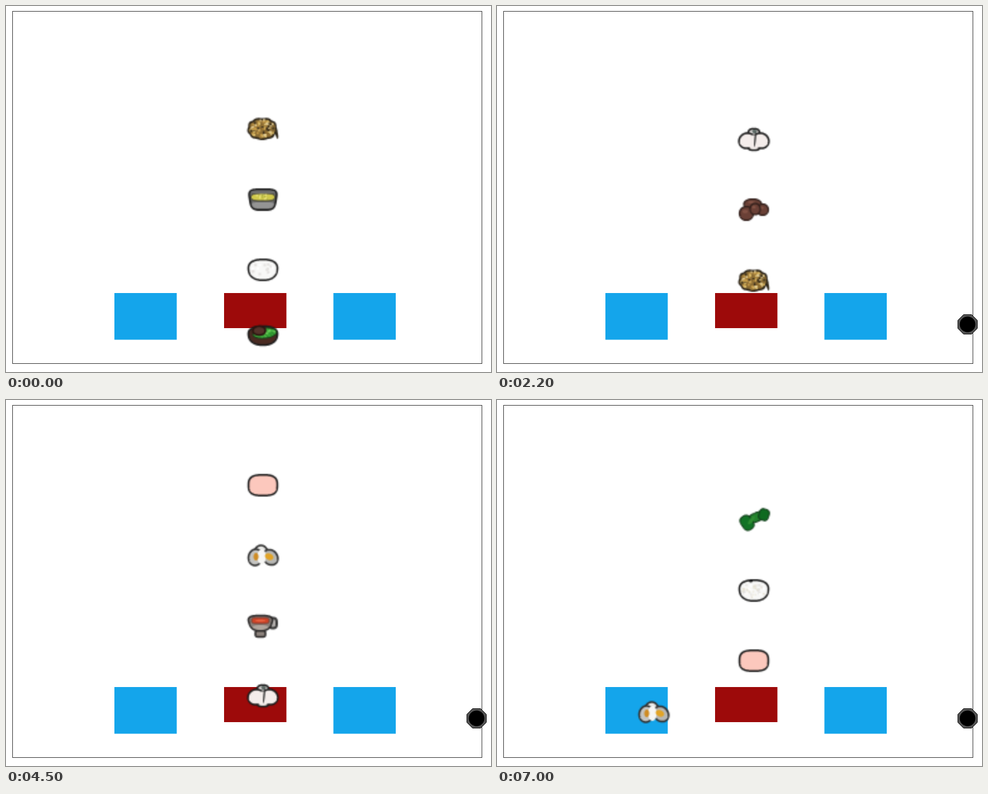
Recreate the animation shown at these times as an HTML page with a canvas. Size 774x584 px, loop 7.1 s.

```html
<!DOCTYPE html>
<html lang="en">
<head>
<meta charset="utf-8">
<title>Falling ingredients</title>
<style>
html, body { margin: 0; width: 100%; height: 100%; overflow: hidden; background: #fff; }
canvas { display: block; }
</style>
</head>
<body>
<canvas id="stage" width="774" height="584"></canvas>
<script>
const W = 774, H = 584, LOOP = 7100, STEP = 100;
const LANE_X = 410, GAP = 112.4, SPAWN_Y = 122, SIDE_SPEED = 0.56, SIDE_REACH = 172;
const ZONE_Y = 463, ZONE_DRAG = 0.1;
const INK = '#1c1c1c';
const ctx = document.getElementById('stage').getContext('2d');

// Distance fallen at given times; linear in between
const FALL = [[0, 0], [1600, 176], [2800, 307], [3800, 423], [5300, 592], [6400, 718], [7100, 793]];

function layer(w, h) {
  const c = document.createElement('canvas');
  c.width = w;
  c.height = h;
  return c.getContext('2d');
}

function paint(g, fill, line, width) {
  if (fill) { g.fillStyle = fill; g.fill(); }
  if (line) { g.strokeStyle = line; g.lineWidth = width; g.stroke(); }
}

// Superellipse: power squares it off, taper narrows the bottom, wave adds bumps
function shape(g, x, y, rx, ry, fill, opt = {}) {
  const { line, width = 3, power = 2, taper = 0, turn = 0, wave = 0, bumps = 9 } = opt;
  const bend = v => Math.sign(v) * Math.abs(v) ** (2 / power);
  g.save();
  g.translate(x, y);
  g.rotate(turn);
  g.beginPath();
  for (let a = 0; a < Math.PI * 2; a += 0.05) {
    const k = 1 + wave * Math.sin(bumps * a);
    const s = bend(Math.sin(a));
    g.lineTo(rx * k * bend(Math.cos(a)) * (1 - taper * s), ry * k * s);
  }
  g.closePath();
  paint(g, fill, line, width);
  g.restore();
}

function speckle(g, count, x, y, rx, ry, colors, size) {
  let seed = count * 7919;
  const rnd = () => (seed = (seed * 16807) % 2147483647) / 2147483647;
  for (let i = 0; i < count; i++) {
    const a = rnd() * Math.PI * 2, r = Math.sqrt(rnd());
    g.fillStyle = colors[Math.floor(rnd() * colors.length)];
    g.fillRect(x + Math.cos(a) * r * rx - size / 2, y + Math.sin(a) * r * ry - size / 2, size, size);
  }
}

const draw = {
  avocado(g) {
    shape(g, 0, 0, 23, 15, '#4a2b22', { line: INK, power: 2.4, taper: 0.1 });
    shape(g, 3, -4, 19, 8, '#3fae3c', { line: '#183c18', width: 2, turn: -0.12 });
    speckle(g, 20, 7, -4, 13, 5, ['#6fce5c', '#2c8f2c'], 3);
    shape(g, -6, -8, 10, 7, '#55332b', { line: '#2a1510' });
  },
  rice(g) {
    shape(g, 0, 0, 23, 16.5, '#f8f8f7', { line: INK, power: 2.4, taper: 0.08 });
    speckle(g, 18, 0, 0, 17, 11, ['#fff', '#e4e2e0'], 4);
  },
  grains(g) {
    draw.rice(g);
    speckle(g, 28, 0, 0, 18, 11, ['#fffefa', '#e6e2d4', '#efece2'], 3);
    shape(g, -5, -15, 3, 2, INK);
  },
  bowl(g) {
    shape(g, 0, 0, 21, 16.5, '#666', { line: INK, power: 4, taper: 0.13 });
    shape(g, 0, 9, 17, 5, '#949494', { power: 4, taper: 0.1 });
    shape(g, 0, -4, 19, 6, '#d0c94c', { line: '#3c3c34', width: 2, power: 3 });
    speckle(g, 14, 0, -4, 15, 4, ['#e9e277', '#adaf3d'], 3);
    shape(g, 0, -12, 19, 2.5, '#6e6e6e', { power: 4 });
  },
  nuts(g) {
    shape(g, -1, 0, 22, 16, '#8a6c35', { line: '#2a2318', wave: 0.03, power: 2.3 });
    speckle(g, 110, -1, 0, 20, 14, ['#c49a48', '#dcbc68', '#3a2e1b', '#8f6c31', '#e8d29a'], 3.4);
    shape(g, 22, 8, 2, 8, '#2f2719', { turn: -0.2 });
  },
  meat(g) {
    const lump = (x, y, rx, ry) => {
      shape(g, x, y, rx, ry, '#6a4036', { line: '#33201c', width: 2.5 });
      shape(g, x - 2, y - 3, rx / 2.5, ry / 4, '#825245');
    };
    lump(-2, -9, 14, 8);
    lump(-12, 6, 11, 11);
    lump(14, 0, 9, 9);
    lump(2, -1, 8, 9);
  },
  garlic(g) {
    shape(g, 0, -12, 9, 5, '#eeeae8', { line: INK, taper: -0.2, power: 3 });
    shape(g, 0, 12, 9, 5, '#e9e2e0', { line: INK, power: 3 });
    for (const side of [-1, 1])
      shape(g, side * 11, 2, 13, 12, '#f4edeb', { line: INK, turn: side * 0.45 });
    shape(g, 0, 4, 12, 11, '#f4edeb');
    shape(g, 2, -1, 1.3, 13, '#333', { turn: 0.1 });
    shape(g, 1, -13, 4, 3, '#5c6965');
  },
  cup(g) {
    shape(g, 16, -5, 6, 8, '#b5b1af', { line: '#3b3b3b', width: 4, power: 3 });
    shape(g, -4, 12, 8, 5, '#8d837d', { line: '#2c2a2a', power: 4 });
    shape(g, -4, -5, 18, 12, '#8b817b', { line: '#2c2a2a', power: 3, taper: 0.22 });
    shape(g, -4, 2, 12, 4, '#b0a49c', { taper: 0.2 });
    shape(g, -4, -9, 14, 5, '#cf4327', { line: '#6b4740', width: 2, power: 4 });
    shape(g, -4, -9, 8, 1.5, '#ea6644');
  },
  eggs(g) {
    const egg = (x, y, tone, turn) =>
      shape(g, x, y, 11, 13, tone, { line: '#303030', turn });
    egg(-3, -3, '#e9e9e7', 0);
    egg(-12, 3, '#c4c4c1', 0.2);
    egg(12, 3, '#b8b8b5', -0.7);
    shape(g, -2, 2, 7, 12, '#f6f6f4');
    shape(g, -11, 2, 4, 6, '#cf8c24');
    shape(g, 10, 2, 7, 5, '#e2a426', { turn: 0.4 });
  },
  pink(g) {
    shape(g, 0, 0, 23, 16.5, '#fcc8bd', { line: INK, power: 2.9 });
  },
  greens(g) {
    const leaf = { line: '#123f1b', width: 2, power: 3 };
    shape(g, 4, -5, 12, 7, '#23812d', { ...leaf, turn: -0.4 });
    shape(g, -11, 4, 9, 12, '#137326', { ...leaf, turn: -0.6 });
    shape(g, 16, -9, 8, 9, '#0e6a20', { ...leaf, turn: 0.3 });
    shape(g, -4, 0, 8, 3, '#2f8d33', { turn: -0.9 });
  }
};

// Kind, moment it is sorted, side it is sent to; each enters one gap above the last
const items = [
  ['avocado'], ['rice', 480, 1], ['bowl', 1650, -1], ['nuts', 2640, -1], ['meat', 3586, -1],
  ['garlic', 4600, 1], ['cup', 5610, 1], ['eggs', 6714, -1], ['pink'], ['grains'], ['greens']
].map(([kind, turn = Infinity, side], i) => ({ turn, side, y: 533.4 - GAP * i, image: sprite(kind) }));

// Drawn at half size and scaled up for a soft pixel look
function sprite(kind) {
  const g = layer(32, 32);
  g.translate(16, 16);
  g.scale(0.5, 0.5);
  draw[kind](g);
  return g.canvas;
}

function fallen(t) {
  const i = FALL.findIndex(([end]) => t < end);
  const [t0, d0] = FALL[i - 1], [t1, d1] = FALL[i];
  return d0 + (d1 - d0) * (t - t0) / (t1 - t0);
}

function place({ turn, side, y: top }, t) {
  const y = top + fallen(Math.min(t, turn));
  if (t < turn) return [0, y - Math.max(0, y - ZONE_Y) * ZONE_DRAG];
  return [side * (t - turn) * SIDE_SPEED, y];
}

function backdrop() {
  const g = layer(W, H);
  const box = (x, h, color) => {
    g.fillStyle = color;
    g.fillRect(x, 458, 99.5, h);
  };
  g.fillStyle = '#fff';
  g.fillRect(0, 0, W, H);
  g.filter = 'blur(0.6px)';
  box(173, 74.5, '#14a5eb');
  box(522.5, 74.5, '#14a5eb');
  box(348, 56, '#9d0a0a');
  g.filter = 'none';
  g.strokeStyle = '#484848';
  g.strokeRect(10.5, 8.5, 749, 562);
  return g.canvas;
}
const scene = backdrop();

function pointer() {
  ctx.beginPath();
  for (let a = Math.PI / 8; a < Math.PI * 2; a += Math.PI / 4)
    ctx.lineTo(751 + 16.8 * Math.cos(a), 508 + 16.8 * Math.sin(a));
  ctx.closePath();
  paint(ctx, '#555', '#111', 1);
  shape(ctx, 751, 508, 12.5, 12.5, '#000');
}

function render(t) {
  ctx.drawImage(scene, 0, 0);
  ctx.save();
  ctx.beginPath();
  ctx.rect(10, 8, 750, 563);
  ctx.clip();
  for (const it of items) {
    const [dx, y] = place(it, t);
    if (y < SPAWN_Y || y > 600 || Math.abs(dx) > SIDE_REACH) continue;
    ctx.drawImage(it.image, Math.round(LANE_X + dx) - 32, Math.round(y) - 32, 64, 64);
  }
  ctx.restore();
  if (t >= STEP) pointer();
}

const start = performance.now();
function tick() {
  const t = (performance.now() - start) % LOOP;
  render(Math.floor(t / STEP) * STEP);
  requestAnimationFrame(tick);
}
tick();
</script>
</body>
</html>
```
